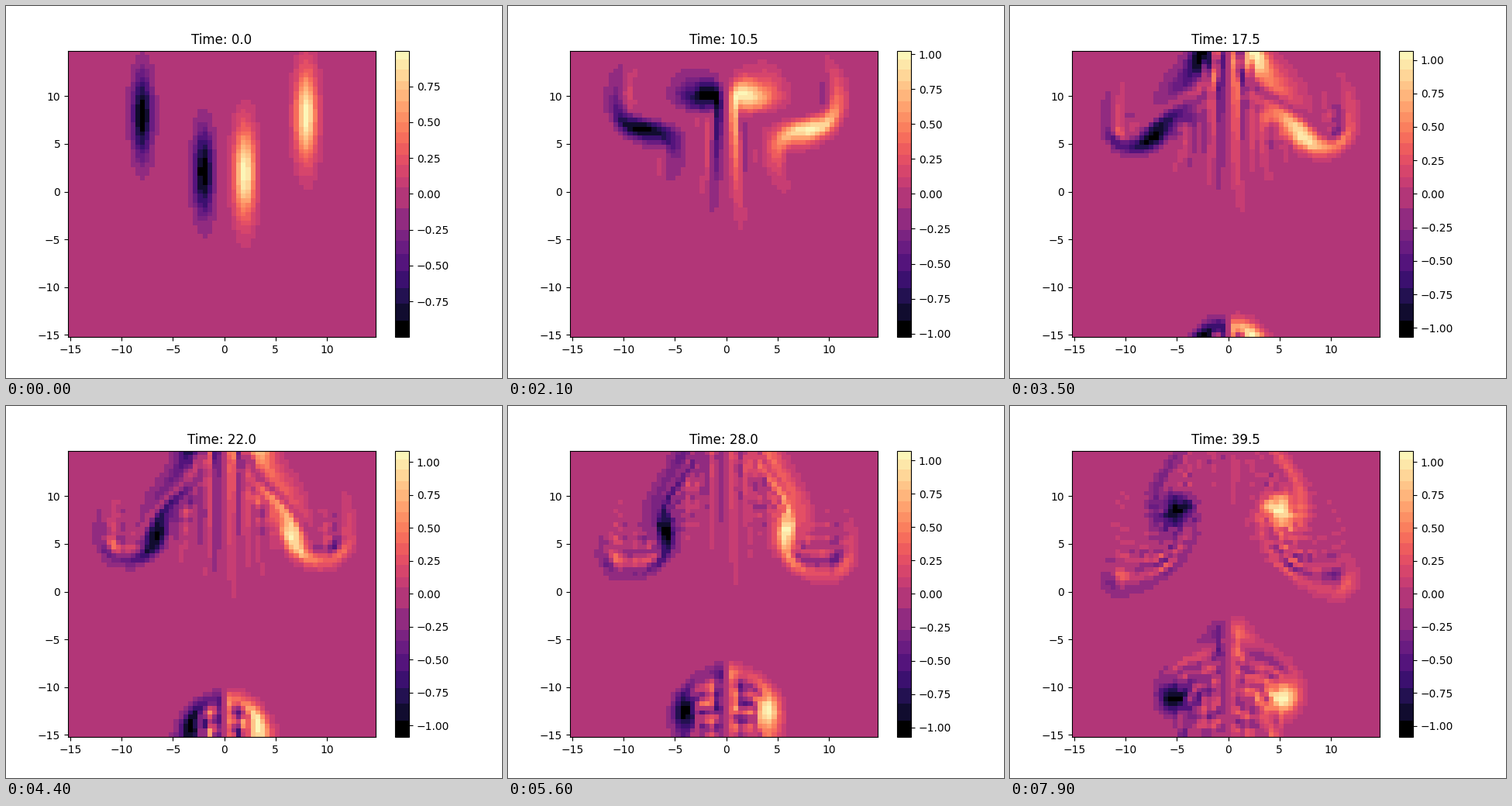
A matplotlib script that plays this animation: 640x480 px, repeating every 8000 ms.

```python
import numpy as np
import matplotlib.pyplot as plt
from matplotlib.animation import FuncAnimation
from matplotlib.colors import ListedColormap

N, L, NU = 64, 30.0, 0.001
FRAMES, STEP, SUB = 80, 0.5, 10
H = L / N

axis = -L / 2 + H * np.arange(N)
X, Y = np.meshgrid(axis, axis)
k = 2 * np.pi * np.fft.fftfreq(N, H)
K2 = k[None, :] ** 2 + k[:, None] ** 2
K2[0, 0] = 1.0


def blob(x0, y0):
    return np.exp(-(X - x0) ** 2 - (Y - y0) ** 2 / 20)


def diff(f, ax):
    return (np.roll(f, -1, ax) - np.roll(f, 1, ax)) / (2 * H)


def laplacian(f):
    return sum(np.roll(f, s, ax) for s in (-1, 1) for ax in (0, 1)) / H**2 - 4 * f / H**2


def rhs(w):
    psi = np.real(np.fft.ifft2(-np.fft.fft2(w) / K2))
    return diff(psi, 1) * diff(w, 0) - diff(psi, 0) * diff(w, 1) + NU * laplacian(w)


def rk4(w, dt):
    a = rhs(w)
    b = rhs(w + dt / 2 * a)
    c = rhs(w + dt / 2 * b)
    d = rhs(w + dt * c)
    return w + dt / 6 * (a + 2 * b + 2 * c + d)


def simulate():
    w = blob(2, 2) - blob(-2, 2) + blob(8, 8) - blob(-8, 8)
    fields = [w]
    for _ in range(FRAMES - 1):
        for _ in range(SUB):
            w = rk4(w, STEP / SUB)
        fields.append(w)
    return fields


def banded_magma():
    """Magma reduced to flat bands, each with its mean colour."""
    edges = [0, .06, .1165, .173, .23, .29, .336, .374, .45, .525, .56, .6, .637,
             .675, .713, .75, .786, .824, .862, .894, .932, .97, 1]
    idx = np.round(np.array(edges) * 256).astype(int)
    colors = plt.get_cmap("magma")(np.arange(256))
    for lo, hi in zip(idx[:-1], idx[1:]):
        colors[lo:hi] = colors[lo:hi].mean(axis=0)
    colors[:idx[1]] = (0, 0, 0, 1)
    colors[idx[8]:idx[9], :3] = np.array([178, 54, 120]) / 255
    return ListedColormap(colors)


fields = simulate()
fig, ax = plt.subplots(figsize=(6.4, 4.8), dpi=100)
mesh = ax.pcolormesh(X, Y, fields[0], cmap=banded_magma(), shading="nearest")
fig.colorbar(mesh, ax=ax)
title = ax.set_title("Time: 0.0")


def update(i):
    w = fields[i]
    mesh.set_array(w)
    mesh.set_clim(w.min(), w.max())
    title.set_text(f"Time: {i * STEP:.1f}")
    return mesh, title


anim = FuncAnimation(fig, update, frames=FRAMES, interval=100, repeat=True, repeat_delay=0)
plt.show()
```
